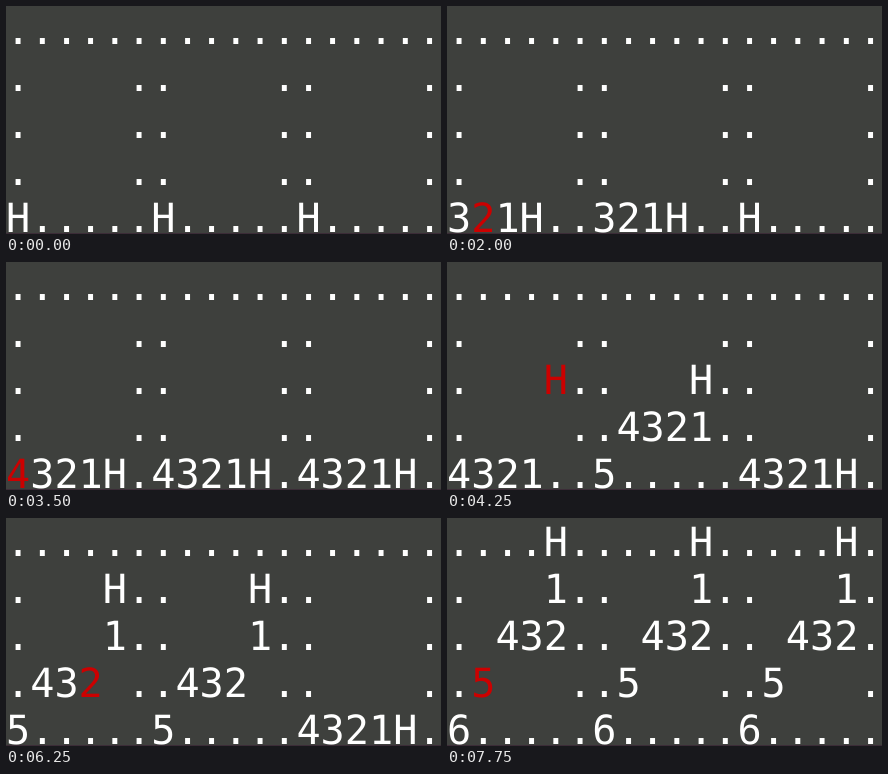
These frames come from a looping animation (435 px wide and 228 px high, 8000 ms). An HTML page:

```html
<!DOCTYPE html>
<html lang="en">
<head>
<meta charset="utf-8">
<title>Rope simulation</title>
<style>
  html, body { margin: 0; width: 100%; height: 100%; overflow: hidden; background: #3e403d; }
  svg { display: block; width: 435px; height: 228px; }
  text {
    font: 40.2px "DejaVu Sans Mono", monospace;
    fill: #fff;
    text-rendering: geometricPrecision;
  }
  text.active { fill: #c00; }
</style>
</head>
<body>
<svg id="stage" viewBox="0 0 435 228">
  <rect y="227" width="435" height="1" fill="#3b2c37"/>
</svg>
<script>
const COLS = 6, ROWS = 5, PANELS = 3, KNOTS = 10;
const CELL = 24.2, LINE = 47, BASE = 38;
const STEP = 250, LOOP = 8000;
const MOVES = [[1, 0, 4], [0, -1, 4]]; // dx, dy, count

const stage = document.getElementById("stage");
const copy = rope => rope.map(k => [...k]);

// Each tick shows one knot being checked. The second panel advances
// once per head move, the third once per whole command.
function simulate() {
  const rope = Array.from({ length: KNOTS }, () => [0, ROWS - 1]);
  let byMove = copy(rope), byCommand = byMove;
  const ticks = [{ ropes: [copy(rope), byMove, byCommand], active: -1 }];

  for (const [dx, dy, count] of MOVES) {
    for (let n = 1; n <= count; n++) {
      const pending = [];
      const record = i => pending.push([copy(rope), i]);
      rope[0][0] += dx;
      rope[0][1] += dy;
      record(0);
      for (let i = 1; i < KNOTS; i++) {
        const moved = follow(rope[i], rope[i - 1]);
        record(i);
        if (!moved) break;
      }
      byMove = copy(rope);
      if (n === count) byCommand = byMove;
      for (const [state, active] of pending) {
        ticks.push({ ropes: [state, byMove, byCommand], active });
      }
    }
  }
  return ticks;
}

function follow(knot, lead) {
  const dx = lead[0] - knot[0], dy = lead[1] - knot[1];
  if (Math.max(Math.abs(dx), Math.abs(dy)) < 2) return false;
  knot[0] += Math.sign(dx);
  knot[1] += Math.sign(dy);
  return true;
}

function makeCell(col, row) {
  const cell = document.createElementNS("http://www.w3.org/2000/svg", "text");
  cell.setAttribute("x", (col * CELL).toFixed(2));
  cell.setAttribute("y", BASE + row * LINE);
  return stage.appendChild(cell);
}

const cells = Array.from({ length: ROWS }, (_, row) =>
  Array.from({ length: COLS * PANELS }, (_, col) => makeCell(col, row)));

function draw({ ropes, active }) {
  cells.forEach((line, row) => line.forEach((cell, col) => {
    const panel = Math.floor(col / COLS), x = col % COLS;
    const knot = ropes[panel].findIndex(k => k[0] === x && k[1] === row);
    const edge = x === 0 || x === COLS - 1 || row === 0 || row === ROWS - 1;
    cell.textContent = knot < 0 ? (edge ? "." : "") : knot || "H";
    cell.classList.toggle("active", panel === 0 && knot >= 0 && knot === active);
  }));
}

const ticks = simulate();
const start = performance.now();
let shown = -1;

function frame() {
  const time = Math.max(0, performance.now() - start) % LOOP;
  const tick = Math.floor(time / STEP);
  if (tick !== shown) draw(ticks[shown = tick]);
  requestAnimationFrame(frame);
}
frame();
</script>
</body>
</html>
```
